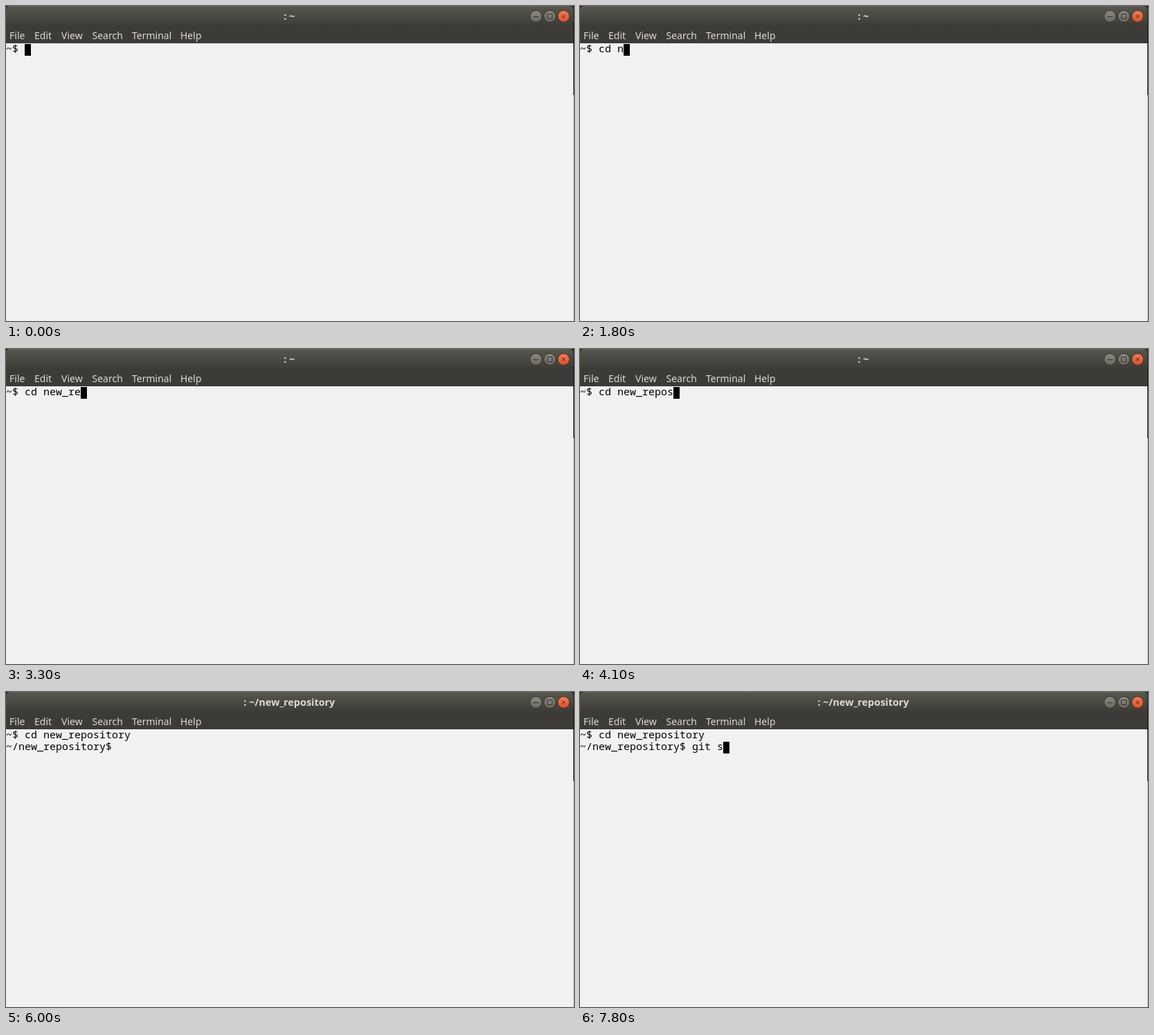
These frames come from a looping animation (821 px wide and 456 px high, 8 s). An HTML page:

```html
<!DOCTYPE html>
<html lang="en">
<head>
<meta charset="utf-8">
<title>Terminal</title>
<style>
  html, body { margin: 0; width: 100%; height: 100%; overflow: hidden; background: #f1f1f1; }
  svg { display: block; }
  text { white-space: pre; }
  .ui { font: 14px "Noto Sans", "Open Sans", sans-serif; fill: #dfdbd2; }
  .title { font-size: 14.4px; font-weight: bold; text-anchor: middle; }
  .mono { font: 15px "Noto Sans Mono", "DejaVu Sans Mono", monospace; fill: #000; }
  .icon { fill: none; stroke: #35342f; }
</style>
</head>
<body>
<svg width="821" height="456" viewBox="0 0 821 456">
  <defs>
    <linearGradient id="bar" x2="0" y2="1">
      <stop stop-color="#58574e"/><stop offset="1" stop-color="#3d3c37"/>
    </linearGradient>
    <linearGradient id="grey" x2="0" y2="1">
      <stop stop-color="#8c8a7f"/><stop offset="1" stop-color="#69685f"/>
    </linearGradient>
    <linearGradient id="red" x2="0" y2="1">
      <stop stop-color="#f47c58"/><stop offset="1" stop-color="#e04f20"/>
    </linearGradient>
  </defs>

  <rect width="821" height="54" fill="#282723"/>
  <path d="M0 54V6Q0 0 6 0H814Q820 0 820 6V54Z" fill="#3c3b37"/>
  <path d="M0 28V6Q0 0 6 0H814Q820 0 820 6V28Z" fill="url(#bar)"/>
  <path d="M5 .5H815" stroke="#66655b"/>
  <rect y="54" width="820" height="402" fill="#f1f1f1"/>
  <rect x="820" y="24" width="1" height="105" fill="#111"/>
  <rect x="820" y="129" width="1" height="327" fill="#b8b8b8"/>

  <g stroke="#32312d">
    <circle cx="766" cy="15" r="8.5" fill="url(#grey)"/>
    <circle cx="786" cy="15" r="8.5" fill="url(#grey)"/>
    <circle cx="806" cy="15" r="8.5" fill="url(#red)"/>
  </g>
  <path class="icon" d="M762 15.5h8M782.5 11.5h7v7h-7zM803.5 12.5l5 5m0-5l-5 5"/>

  <text id="title" class="ui title" x="409.5" y="20"></text>
  <g class="ui">
    <text x="5" y="48">File</text>
    <text x="41" y="48">Edit</text>
    <text x="80" y="48">View</text>
    <text x="124.5" y="48">Search</text>
    <text x="182" y="48">Terminal</text>
    <text x="252" y="48">Help</text>
  </g>

  <text id="line0" class="mono" y="67"></text>
  <text id="line1" class="mono" y="84"></text>
  <rect id="cursor" width="9" height="17"/>
</svg>
<script>
  const LOOP = 8000, ENTER = 5400, CELL = 9, LINE = 17;
  const lines = [
    { prompt: "~$ ", text: "cd new_repository",
      keys: [1100, 1300, 1400, 1800, 2100, 2300, 2700, 3200, 3300,
             3800, 3900, 4100, 4300, 4500, 4700, 4800, 5000] },
    { prompt: "~/new_repository$ ", text: "git s",
      keys: [7000, 7100, 7300, 7400, 7800] }
  ];
  const blinks = [[200, 800], [6000, 6600]];
  const $ = id => document.getElementById(id);

  const typed = ({ prompt, text, keys }, t) =>
    prompt + text.slice(0, keys.filter(k => k <= t).length);

  function draw(t) {
    const row = t < ENTER ? 0 : 1;
    const shown = lines.map((line, i) => i > row ? "" : typed(line, t));
    shown.forEach((s, i) => $("line" + i).textContent = s);
    $("title").textContent = row ? ": ~/new_repository" : ": ~";

    const cursor = $("cursor");
    cursor.setAttribute("x", shown[row].length * CELL);
    cursor.setAttribute("y", 55 + row * LINE);
    const hidden = blinks.some(([from, to]) => t >= from && t < to);
    cursor.style.visibility = hidden ? "hidden" : "visible";
  }

  const start = performance.now();
  function tick() {
    draw((performance.now() - start) % LOOP);
    requestAnimationFrame(tick);
  }
  tick();
</script>
</body>
</html>
```
